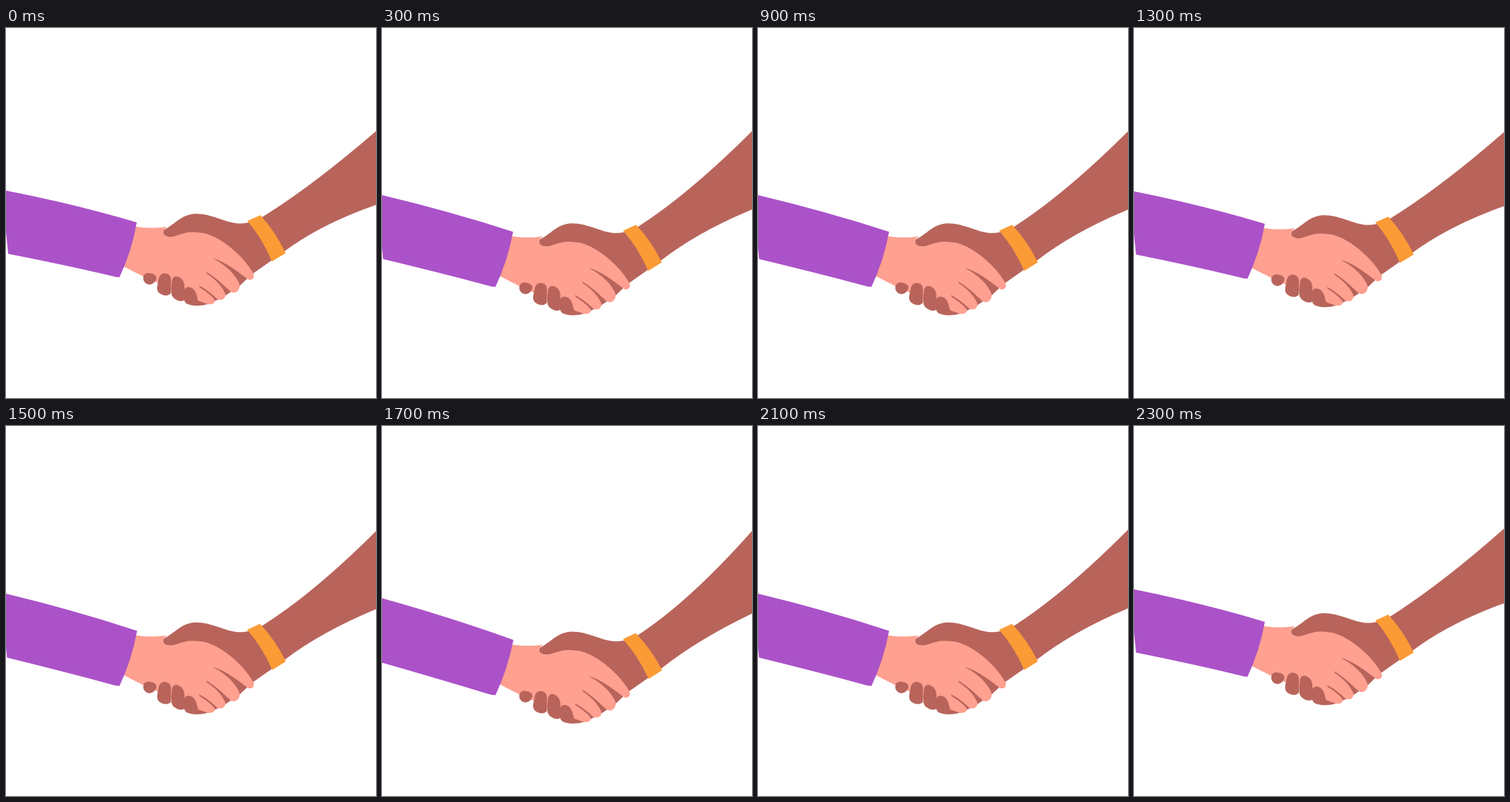
Animation of 512x512 px, one loop 2400 ms. Source, as an HTML page:

```html
<!DOCTYPE html>
<html lang="en">
<head>
<meta charset="utf-8">
<title>Handshake</title>
<style>
  html, body { margin: 0; width: 100%; height: 100%; overflow: hidden; background: #fff; }
  svg { display: block; width: 100%; height: 100%; }
  .brown { fill: #b8645b; }
  .pale { fill: #ffa090; }
</style>
</head>
<body>
<svg viewBox="0 0 512 512">
  <path id="arm" class="brown"/>
  <g id="hands">
    <path class="pale" d="M160 275L181 275C195 277 208 277 222 275L219 279C214 285 221 290 230 289
      C241 286 248 282 262 282.5L275 284C300 291 328 315 342 339C345 345 341 350 335 348
      C318 335 305 325 289 319.5L287 318L289 320.5C304 328 318 342 323 354C325 362 318 369 311 365
      C299 354 290 345 278 338L277 337L278 340C289 347 300 358 303.500 368C305 375 297 378 292 375
      C286 369 278 362 268 357L267 356L268 359C276 364 286 371 289 377C289 382 283 383 278 382
      L266 378L245 370L215 355Q187 343 163 330Z"/>
    <g class="brown">
      <path d="M190 346C190 340 195 338 200 339.500C205 340 209 343 208 347C206 353 202 355 198 355C193 354 190 351 190 346Z"/>
      <path d="M211 349C212 341 217 338 223 340C228 342 229 347 228 354L228 367C225 371 219 371 214 368C207 364 209 358 211 349Z"/>
      <path d="M229.500 351C230 344 235 342 240 345C246 348 247 354 247 360L249 374C246 379 240 379 234 375C227 371 228 362 229.500 351Z"/>
      <path d="M247 364C247 358 254 357 259 361C264 366 264 372 266 377.500L279 382C271 385 258 385 251 382C245 379 246 372 247 364Z"/>
    </g>
    <path id="band" fill="#fa9b36" d="M334 267L352 259Q373 282 387 311.500L368 323Q354 290 334 267Z"/>
  </g>
  <path id="sleeve" fill="#ab52c9"/>
</svg>
<script>
const LOOP = 2400, STEP = 100;
// shoulder drift every 300 ms
const drift = [-.3, -.3, 0, 0, .3, 2.4, 2.2, .5, -1.6];
const el = id => document.getElementById(id);
const arm = el('arm'), hands = el('hands'), band = el('band'), sleeve = el('sleeve');

function driftAt(t) {
  const i = Math.floor(t / 300), f = t / 300 - i;
  return drift[i] + (drift[i + 1] - drift[i]) * f;
}

function draw(t) {
  const size = t < LOOP / 2 ? 26.5 : 29.4;
  const d = size * (1 - Math.cos(2 * Math.PI * t / 1200)) / 2;
  const s = driftAt(t);

  hands.setAttribute('transform', `translate(0 ${d})`);
  band.setAttribute('transform', `rotate(${-.06 * d} 355 290)`);

  const p = (x, y) => `${x} ${y + d} `;
  arm.setAttribute('d',
    `M520 ${136 + s}L512 ${143 + s}Q425 ${218 + .88 * d + s / 2} ${p(354, 262)}` +
    `Q${p(343, 268)}${p(334, 269.5)}C${p(310, 275)}${p(290, 257)}${p(262, 257)}` +
    `C${p(242, 258)}${p(235, 271)}${p(219, 279)}C${p(214, 285)}${p(221, 290)}${p(230, 289)}` +
    `L${p(262, 300)}L${p(262, 383)}L${p(278, 382)}Q${p(291, 378)}${p(304, 370)}` +
    `L${p(322, 358)}L${p(340, 341)}L${p(367, 322)}L${p(386, 308.5)}` +
    `Q437 ${271 + .85 * d + s / 2} 512 ${245 + .48 * d + s * .6}L520 ${241 + .48 * d + s * .6}Z`);

  const top = 225 + .48 * d, low = 312.5 + .55 * d, x = 3 - .11 * d;
  sleeve.setAttribute('d',
    `M-3 ${top - .6}L0 ${top}Q95 ${243.5 + .78 * d} ${181 + .03 * d} ${269 + .98 * d}` +
    `Q${p(174, 309)}${p(157, 345)}Q${p(152, 345)}${p(146, 343)}` +
    `Q80 ${327.5 + .84 * d} ${x} ${low}L${x - 3} ${low - 30}L-3 ${low - 60}Z`);
}

function frame(now) {
  draw(Math.floor(now % LOOP / STEP) * STEP);
  requestAnimationFrame(frame);
}
draw(0);
requestAnimationFrame(frame);
</script>
</body>
</html>
```
